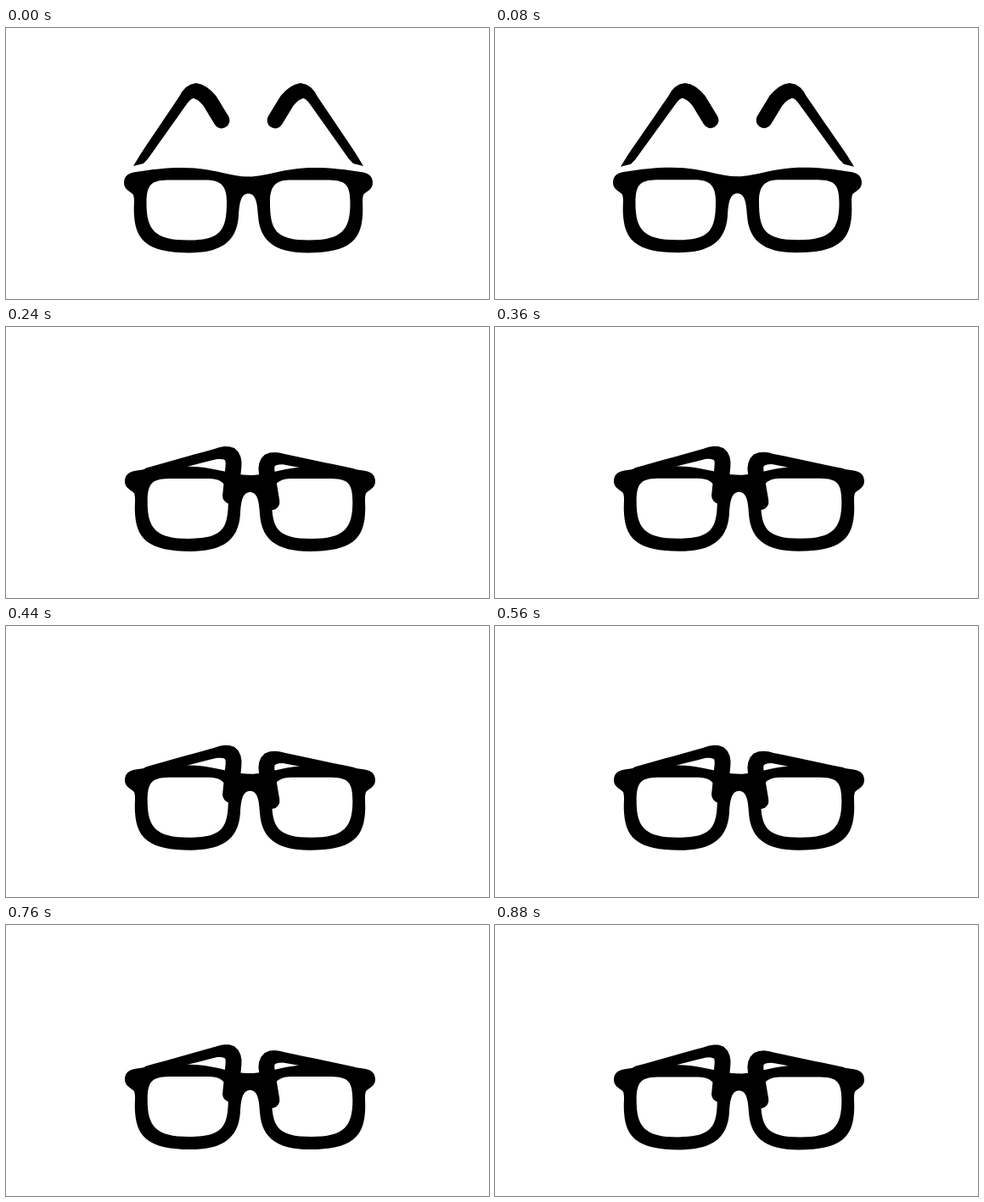
An HTML page for the animation above (0.92 s loop, 569 by 320 pixels).

```html
<!DOCTYPE html>
<html lang="en">
<head>
<meta charset="utf-8">
<title>Folding glasses</title>
<style>
html, body { margin: 0; width: 100%; height: 100%; overflow: hidden; background: #fff; }
svg { display: block; width: 100%; height: 100%; }
</style>
</head>
<body>
<svg viewBox="0 0 569 320">
  <g id="glasses">
    <path id="left"/>
    <path id="right"/>
    <g id="front">
      <path id="half" fill-rule="evenodd" d="M286 175.500C262 175.500 245 165 208 165
        C188 165 172 167 153 170C145 171 139 174 139 183C139 191 147 193 150 197
        C152 204 150 210 151 222C153 250 166 265.500 216 265.500C256 265.500 272 250 274 222
        C275 205 277 195.500 286 195.500Z
        M165.500 207C165.500 185 171 180 190 179.500L238 179.500C254 180 260 188 260 205
        C260 238 254 250.500 214 250.500C175 250.500 165.500 238 165.500 207Z"/>
      <use href="#half" transform="translate(571) scale(-1 1)"/>
    </g>
  </g>
</svg>
<script>
const LOOP = 920, STEP = 40, SAMPLES = 8;
const $ = id => document.getElementById(id);
const clamp = x => Math.min(1, Math.max(0, x));
const ramp = (t, from, to) => clamp((t - from) / (to - from));
const lerp = (a, b, k) => a + (b - a) * k;
const mix = (p, q, k) => p.map((v, i) => lerp(v, q[i], k));

// Centre line of an arm: hinge, bend start, bend corner, bend end, tip
const open = [[156, 161.5], [209.5, 84], [222, 64], [240, 86], [254, 109]];
const shut = [[154, 175], [246, 150.5], [269, 145], [267, 165], [263.5, 200]];

// u: 0 to 1 straight shaft, 1 to 2 bend, 2 to 3 straight end
function centre([hinge, a, corner, b, tip], u) {
  if (u <= 1) return mix(hinge, a, u);
  if (u >= 2) return mix(b, tip, u - 2);
  return mix(mix(a, corner, u - 1), mix(corner, b, u - 1), u - 1);
}

const radius = u => 5 + 1.2 * clamp(u) + 3.2 * clamp(2 * u - 2);

// Tapered shaft with a slanted hinge end and a round tip
function arm(fold, spread) {
  const line = open.map((p, i) => mix(p, shut[i], fold));
  line[0][0] -= spread * (1 - fold);
  line[0][1] += spread / 2 * (1 - fold);
  const outer = [], inner = [];
  for (let i = 0; i <= 3 * SAMPLES; i++) {
    const u = i / SAMPLES, r = radius(u);
    const [x, y] = centre(line, u);
    const [x0, y0] = centre(line, Math.max(0, u - .02));
    const [x1, y1] = centre(line, Math.min(3, u + .02));
    const k = r / Math.hypot(x1 - x0, y1 - y0);
    const [nx, ny] = u ? [(y1 - y0) * k, (x0 - x1) * k] : [-6, 1.5];
    outer.push([x + nx, y + ny]);
    inner.unshift([x - nx, y - ny]);
  }
  const r = radius(3);
  return `M${outer.join("L")}A${r} ${r} 0 0 1 ${inner.join("L")}Z`;
}

function draw(time) {
  const t = Math.floor(time % LOOP / STEP) * STEP;
  const foldL = ramp(t, 80, 160), foldR = ramp(t, 160, 240);
  const spread = 2 * ramp(t, 0, 80);
  const x0 = 139 - 2 * foldL + 3 * foldR;
  const x1 = 432 + foldL + 2 * foldR;
  const scale = (x1 - x0) / 293;
  const stretch = 1 + .03 * foldL * (1 - foldR);

  $("glasses").setAttribute("transform", `translate(0 ${-.8 * Math.sin(Math.PI * t / LOOP)})`);
  $("front").setAttribute("transform", `translate(${x0 - 139 * scale}) scale(${scale} 1)`);
  $("left").setAttribute("d", arm(foldL, spread));
  $("left").setAttribute("transform", `translate(${(x0 - 139) * foldL})`);
  // The right arm mirrors the left one and folds a little lower
  $("right").setAttribute("d", arm(foldR, spread));
  $("right").setAttribute("transform", `translate(${571 + (x1 - 432) * foldR}) scale(-1 1)
    translate(150 165) rotate(${3.7 * foldR}) scale(${stretch}) translate(-150 -165)`);
}

const start = performance.now();
function tick() {
  draw(performance.now() - start);
  requestAnimationFrame(tick);
}
tick();
</script>
</body>
</html>
```
